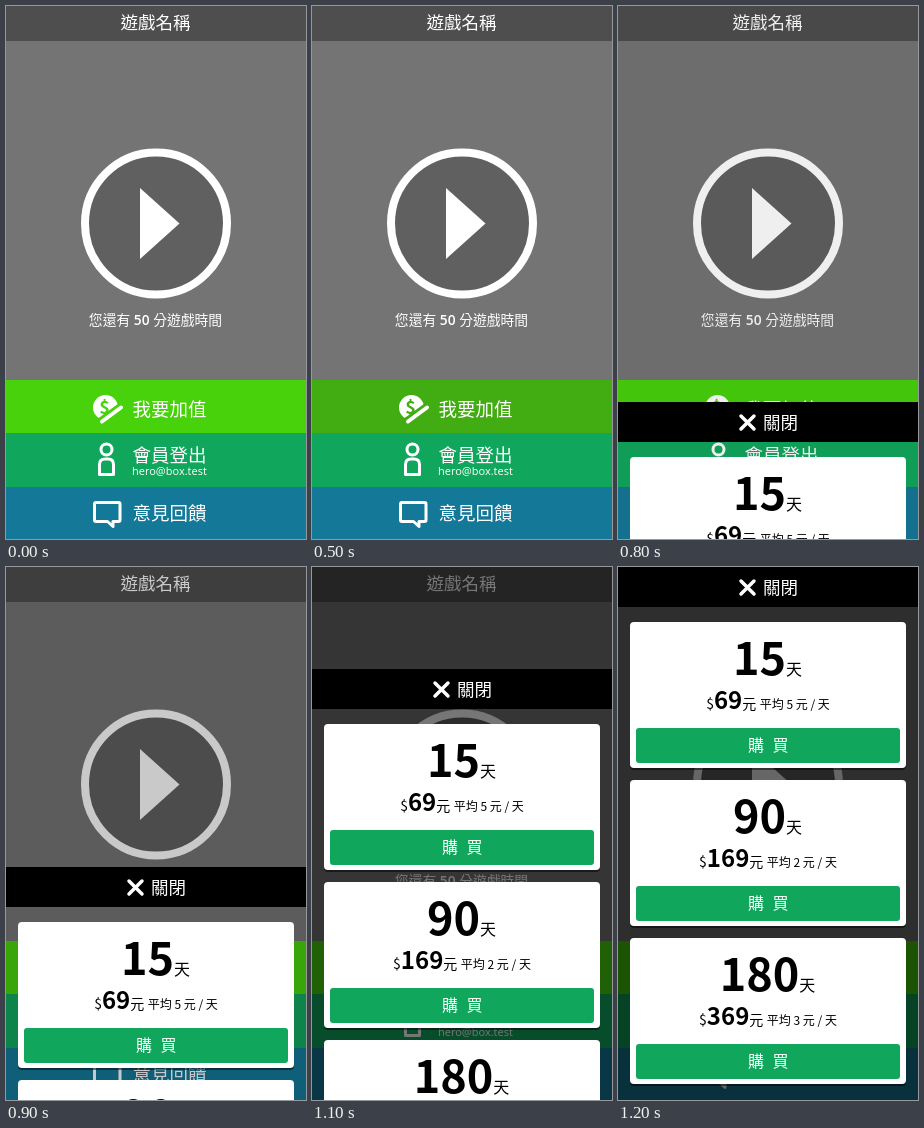
An HTML page that plays this animation: 300x533 px, repeating every 3200 ms.

```html
<!DOCTYPE html>
<html lang="zh-Hant">
<head>
<meta charset="utf-8">
<style>
html, body { margin: 0; width: 100%; height: 100%; overflow: hidden; background: #747474; }
svg { display: block; width: 300px; height: 533px; font-family: "Noto Sans CJK TC", "Noto Sans CJK", sans-serif; }
.label { font-size: 18.5px; }
.latin { font-family: "Open Sans", "Noto Sans", sans-serif; font-weight: 600; }
.mail { font-size: 11px; font-weight: 500; }
.line { fill: none; stroke: #fff; stroke-width: 3; stroke-linejoin: round; }
.mid { text-anchor: middle; }
.days { font-size: 16px; }
.days .num { font-size: 45px; font-weight: 700; }
.price { font-size: 14px; }
.price .num { font-size: 24px; font-weight: 700; }
.price .avg { font-size: 12px; }
</style>
</head>
<body>
<svg viewBox="0 0 300 533" xmlns="http://www.w3.org/2000/svg">
  <rect width="300" height="533" fill="#747474"/>
  <rect width="300" height="35" fill="#4e4e4e"/>
  <g fill="#fff">
    <text class="mid" x="149.500" y="23" font-size="17.500">遊戲名稱</text>
    <circle cx="150" cy="217.500" r="71" fill="#606060" stroke="#fff" stroke-width="8"/>
    <path d="M134 182L173.500 217.500L134 253Z"/>
    <text class="mid" x="149.500" y="318.500" font-size="13.800">您還有<tspan class="latin"> 50 </tspan>分遊戲時間</text>

    <g id="topUp">
      <rect y="374" width="300" height="53" fill="currentColor"/>
      <circle cx="99.500" cy="401.500" r="12.500"/>
      <text class="mid" x="98.500" y="407.500" font-size="18" font-weight="700" fill="currentColor">$</text>
      <path d="M88 421L119 398.500" stroke="currentColor" stroke-width="9"/>
      <path d="M96 415.500L115 401.500" stroke="#fff" stroke-width="4" stroke-linecap="round"/>
      <text class="label" x="126.500" y="409.500">我要加值</text>
    </g>

    <rect y="427" width="300" height="54" fill="#10a75d"/>
    <circle class="line" cx="100.500" cy="443.500" r="5.500"/>
    <path class="line" d="M93.500 468.500V458.500Q93.500 453 99 453H102Q107.500 453 107.500 458.500V468.500Z"/>
    <text class="label" x="126.500" y="456">會員登出</text>
    <text class="latin mail" x="126" y="469">hero@box.test</text>

    <rect y="481" width="300" height="52" fill="#147898"/>
    <path class="line" d="M90 496.500H112.500Q114 496.500 114 498V514Q114 515.500 112.500 515.500H107V520.500L101.500 515.500H90Q88.500 515.500 88.500 514V498Q88.500 496.500 90 496.500Z"/>
    <text class="label" x="126.500" y="513.500">意見回饋</text>
  </g>

  <rect id="dim" width="300" height="533" opacity="0"/>
  <g id="panel" transform="translate(0 533)">
    <rect width="300" height="40"/>
    <path d="M123 14L136 27M136 14L123 27" stroke="#fff" stroke-width="3.500" stroke-linecap="round"/>
    <text x="145" y="27" font-size="17.500" fill="#fff">關閉</text>
    <g id="cards"></g>
  </g>
</svg>
<script>
const LOOP = 3200, STEP = 100, SLIDE_AT = 700, STEPS = 5;
const TOPS = [533, 396, 300, 204, 102, 0];
const PLANS = [[15, 69, 5], [90, 169, 2], [180, 369, 3]];
const $ = id => document.getElementById(id);

const card = ([days, price, avg], i) => `
  <g transform="translate(0 ${55 + i * 158})">
    <rect x="12" y="1.5" width="276" height="146.5" rx="4" opacity=".5"/>
    <rect x="12" width="276" height="146" rx="4" fill="#fff"/>
    <text class="mid days" x="149.5" y="53"><tspan class="num">${days}</tspan>天</text>
    <text class="mid price" x="150" y="87">$<tspan class="num">${price}</tspan>元<tspan class="avg" dx="3.5">平均 ${avg} 元 / 天</tspan></text>
    <rect x="18" y="106" width="264" height="35" rx="3" fill="#10a75d"/>
    <text x="130 154.5" y="129" font-size="16" fill="#fff">購買</text>
  </g>`;
$("cards").innerHTML = PLANS.map(card).join("");

const smooth = x => x * x * (3 - 2 * x);

function draw(t) {
  const pressed = t >= 500 && t < SLIDE_AT;
  const k = Math.max(0, Math.min(STEPS, Math.floor((t - SLIDE_AT) / STEP)));
  $("topUp").style.color = pressed ? "#42ac13" : "#47d20c";
  $("dim").setAttribute("opacity", 0.6 * smooth(k / STEPS));
  $("panel").setAttribute("transform", `translate(0 ${TOPS[k]})`);
}

const start = performance.now();
function tick() {
  draw((performance.now() - start) % LOOP);
  requestAnimationFrame(tick);
}
tick();
</script>
</body>
</html>
```
